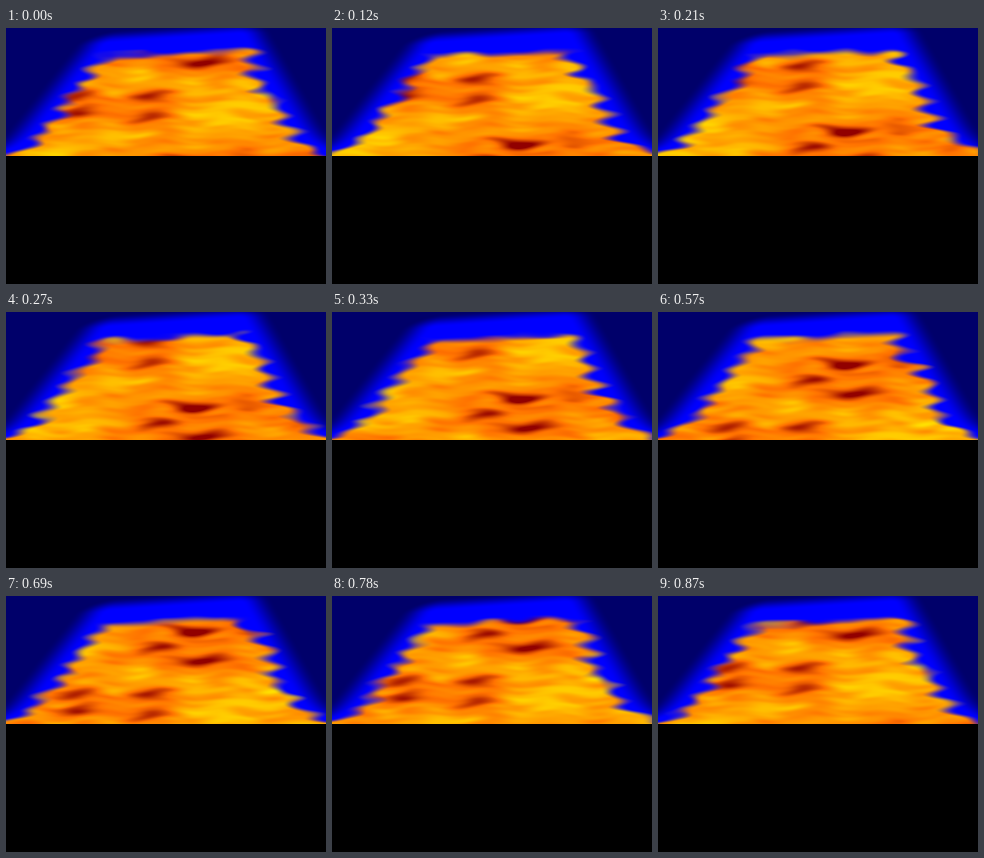
An HTML page with a canvas for the animation above (0.9 s loop, 320 px wide and 256 px high).

```html
<!DOCTYPE html>
<html lang="en">
<head>
<meta charset="utf-8">
<title>Fire</title>
<style>
html, body { margin: 0; width: 100%; height: 100%; overflow: hidden; background: #000; }
canvas { display: block; }
</style>
</head>
<body>
<canvas id="stage" width="320" height="256"></canvas>
<script>
const W = 320, H = 128, STEP = 30, STEPS = 30;
const ctx = document.getElementById('stage').getContext('2d');
const img = ctx.createImageData(W, H);

const clamp = (v, a = 0, b = 1) => Math.min(b, Math.max(a, v));
const mix = (a, b, k) => a + (b - a) * k;
const smooth = k => { k = clamp(k); return k * k * (3 - 2 * k); };
const wrap = v => ((v % H) + H) % H;
const wave = (n, y, peak) => Math.cos(2 * Math.PI * n * (y - peak) / H);

// Flame outline: slanted sides that flare out at the foot
const leftSide = y => 120 - .79 * y - 32 * (y / H) ** 19;
const rightSide = y => 225 + .56 * y + 36 * (y / H) ** 14;

// Smooth seeded noise, -1 to 1, that repeats vertically
const COLS = 12, ROWS = 18;
let seed = 29;
const random = () => (seed = seed * 16807 % 2147483647) / 2147483647;
const grid = Array.from({ length: (COLS + 1) * ROWS }, random);
function noise(x, y) {
  const gx = clamp(x / W * COLS, 0, COLS - .001), gy = wrap(y) / H * ROWS;
  const i = Math.floor(gx), j = Math.floor(gy) % ROWS, k = (j + 1) % ROWS;
  const row = r => mix(grid[r * (COLS + 1) + i], grid[r * (COLS + 1) + i + 1], smooth(gx - i));
  return mix(row(j), row(k), smooth(gy - Math.floor(gy))) * 2 - 1;
}

// Main dark embers: x, y, half width
const embers = [[184, 4, 24], [197, 33, 22], [148, 22, 18], [142, 88, 19], [148, 69, 18], [72, 68, 18], [72, 85, 15]];

function ember(x, y, [cx, cy, r]) {
  const dx = (x - cx) / r, dy = (wrap(y - cy + H / 2) - H / 2) / 5;
  return Math.exp(-.8 * (dx * dx + dy * dy));
}

function heat(x, y) {
  const px = x + 4 * wave(9, y, 68), py = y + 1.5 * Math.sin(x / 11);
  let h = .64 + .15 * noise(px, py) + .06 * noise(W - x, py * 2);
  h += .13 * wave(1, y, 75) * clamp((x - 130) / 90, -1, 1);
  for (const e of embers) h -= .026 * e[2] * ember(px, py, e);
  return clamp(h);
}

// Rolling fire texture, ragged sides and the still blue glow
const fire = new Float32Array(W * H), rough = new Float32Array(W * H), glow = new Float32Array(W * H);
const leftRag = [], rightRag = [];
for (let y = 0; y < H; y++) {
  leftRag[y] = 4 * wave(9, y, 68) + 3 * wave(4, y, 104);
  rightRag[y] = 7 * wave(8, y, 7) + 4 * wave(2, y, 22);
  for (let x = 0; x < W; x++) {
    const p = y * W + x;
    fire[p] = heat(x, y);
    rough[p] = noise(x, y);
    const out = Math.max(leftSide(y) - x, x - rightSide(y));
    const over = 17 - (x - 90) * .07 - y;
    glow[p] = smooth(1.1 - Math.hypot(Math.max(0, out - 4) / 32, Math.max(0, over) / 13));
  }
}

function draw(step) {
  const shift = Math.round(step * H / STEPS), d = img.data;
  for (let y = 0; y < H; y++) {
    const v = (y + shift) % H;
    const l = leftSide(y) - leftRag[v], r = rightSide(y) + rightRag[v];
    for (let x = 0; x < W; x++) {
      const p = y * W + x, q = v * W + x, h = fire[q], n = rough[q];
      const side = Math.min(x - l, r - x) + 7 * n;
      const top = 27 - (x - 130) * .04 - 3 * n;
      const a = smooth((side + 11) / 22) * smooth((y - top + 5) / 9);
      d[p * 4] = Math.min(255, 145 + 230 * h) * a;
      d[p * 4 + 1] = 238 * h * a;
      d[p * 4 + 2] = (106 + 149 * glow[p]) * (1 - a);
      d[p * 4 + 3] = 255;
    }
  }
  ctx.putImageData(img, 0, 0);
}

ctx.fillRect(0, 0, W, 256);
const start = performance.now();
let last = -1;
function tick() {
  const step = Math.floor((performance.now() - start) / STEP) % STEPS;
  if (step !== last) draw(last = step);
  requestAnimationFrame(tick);
}
tick();
</script>
</body>
</html>
```
